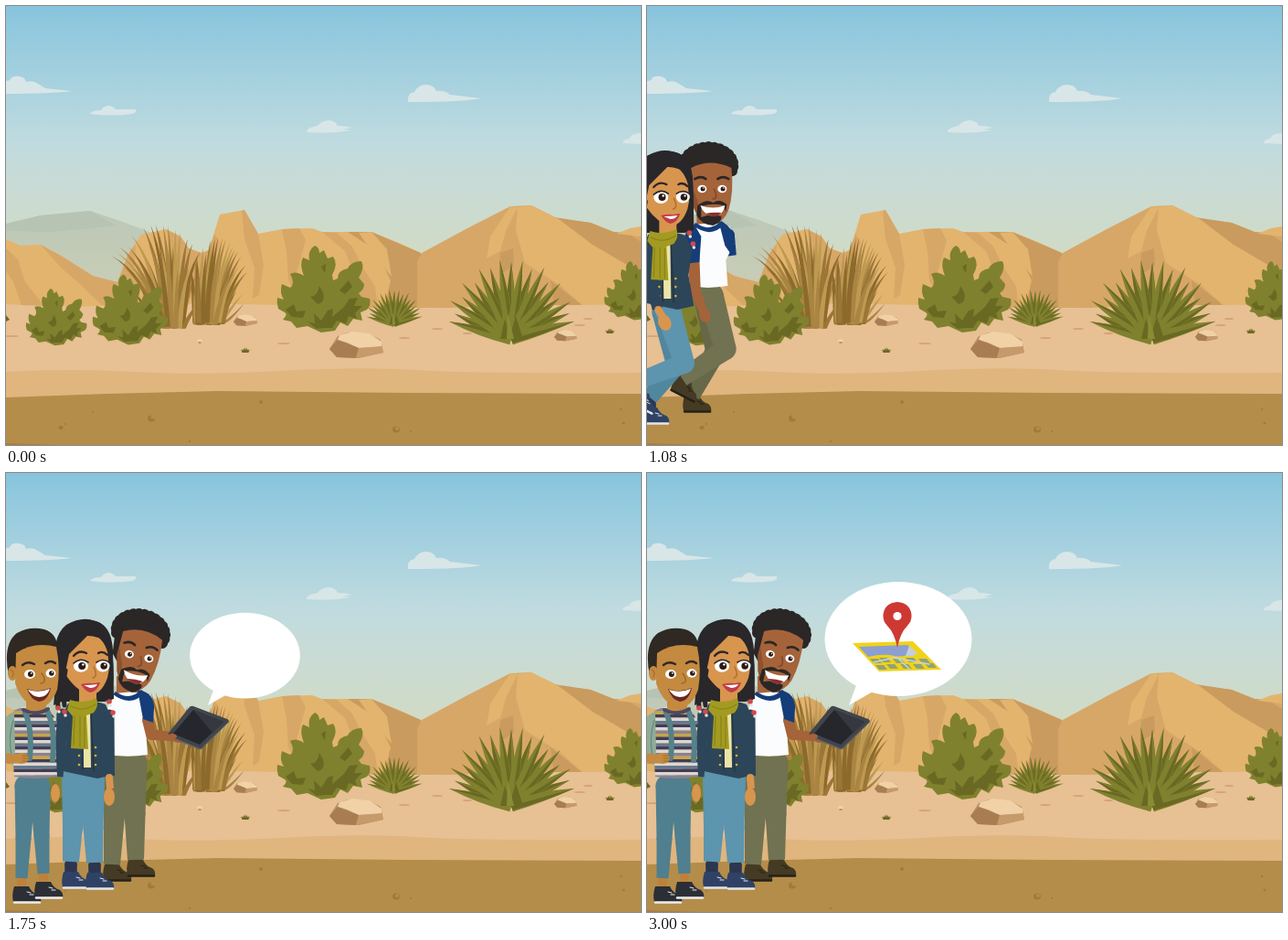
An HTML page with a canvas for the animation above (3080 ms loop, 695x480 px).

```html
<!DOCTYPE html>
<html lang="en">
<head>
<meta charset="utf-8">
<title>Desert walk</title>
<style>
html, body { margin: 0; width: 100%; height: 100%; overflow: hidden; }
canvas { display: block; width: 100%; height: 100%; }
</style>
</head>
<body>
<canvas id="stage" width="695" height="480"></canvas>
<script>
const W = 695, H = 480, LOOP = 3080, STEP = 1000 / 12;
const stage = document.getElementById('stage').getContext('2d');
let c = stage;

const clamp = v => Math.max(0, Math.min(1, v));
const smooth = v => v * v * (3 - 2 * v);
const paths = {};
const path = d => paths[d] || (paths[d] = new Path2D(d));

function fill(col, d) { c.fillStyle = col; c.fill(path(d)); }
function line(col, w, d) {
  c.strokeStyle = col; c.lineWidth = w;
  c.lineCap = c.lineJoin = 'round';
  c.stroke(path(d));
}
function oval(col, x, y, rx, ry = rx, rot = 0) {
  c.fillStyle = col;
  c.beginPath();
  c.ellipse(x, y, rx, ry, rot, 0, 7);
  c.fill();
}
function at(x, y, rot, s, draw) {
  c.save();
  c.translate(x, y); c.rotate(rot); c.scale(s, s);
  draw();
  c.restore();
}
function limb(col, x1, y1, w1, x2, y2, w2) {
  const a = Math.atan2(y2 - y1, x2 - x1) + Math.PI / 2;
  const nx = Math.cos(a) / 2, ny = Math.sin(a) / 2;
  c.fillStyle = col;
  c.beginPath();
  c.moveTo(x1 + nx * w1, y1 + ny * w1);
  c.lineTo(x2 + nx * w2, y2 + ny * w2);
  c.lineTo(x2 - nx * w2, y2 - ny * w2);
  c.lineTo(x1 - nx * w1, y1 - ny * w1);
  c.fill();
  oval(col, x1, y1, w1 / 2);
}
function blade(col, x0, y0, x1, y1, cx, cy, w) {
  c.fillStyle = col;
  c.beginPath();
  c.moveTo(x0 - w / 2, y0);
  c.quadraticCurveTo(cx - w / 2, cy, x1, y1);
  c.quadraticCurveTo(cx + w / 2, cy, x0 + w / 2, y0);
  c.fill();
}

/* ---------- scenery ---------- */

const OLIVE = '#80812e', DARK_OLIVE = '#6a6923';

function bush(x, y, s) {
  at(x, y, 0, s, () => {
    c.translate(-297, -262);
    fill(OLIVE, 'M345 357L330 350 318 352 312 345 303 343Q309 337 305 335L298 331Q296 325 297 319L304 321Q299 313 302 304L311 308Q317 304 311 293Q317 289 326 295Q321 282 325 275L332 278Q330 267 338 262Q343 264 343 270L348 267 352 276 358 274Q364 282 357 294L358 300 363 298Q363 289 374 287Q378 279 389 279Q393 286 386 297L392 304Q392 310 386 314L389 318 398 320Q400 327 395 332L388 335 390 344 380 342 374 350 366 346 360 355Z');
    fill(DARK_OLIVE, 'M340 353L330 345 338 347 337 336 345 344 352 333 358 331 357 340 370 329 376 320 385 319 381 328 390 328 382 336 384 342 375 339 372 347 362 344 357 352 348 352Z');
    fill(DARK_OLIVE, 'M333 318Q341 318 343 306L347 313Q350 324 341 326ZM306 332L315 326 318 334 328 333 325 341 313 340Z');
    fill(DARK_OLIVE, 'M365 311L375 300 379 307 371 315ZM345 285L350 282 349 292Z');
  });
}

function agave(x, y, s) {
  at(x, y, 0, s, () => {
    const n = 19;
    for (const back of [1, 0]) for (let i = 0; i < n; i++) {
      if (i % 2 !== back) continue;
      const f = i / (n - 1) * 2 - 1, a = f * 1.3;
      const len = 88 - 17 * Math.abs(f) - back * 7 + (i * 7 % 5);
      at(0, 0, a, 1, () => {
        blade(back ? DARK_OLIVE : OLIVE, 0, 0, 0, -len, -1, -len * .5, 13);
        c.fillStyle = back ? OLIVE : DARK_OLIVE;
        c.beginPath();
        c.moveTo(0, 0); c.lineTo(0, -len);
        c.quadraticCurveTo(5, -len * .5, 5, 0);
        c.fill();
      });
    }
    fill(DARK_OLIVE, 'M-12 0L-7 -22 -1 -5 5 -25 13 0Z');
    fill('#898c35', 'M-5 0L-4 -28 3 0Z');
  });
}

function reeds(base, mid, top, spread, foot, seed) {
  const rnd = () => (seed = seed * 16807 % 2147483647) / 2147483647;
  const cols = ['#8c6a2c', '#a98442', '#bd9a50', '#9a7637'];
  for (let i = 0; i < 38; i++) {
    const f = ((i * 11) % 38) / 37 * 2 - 1;
    const tall = i % 3 ? rnd() * 50 : 0;
    const tx = mid + f * spread, ty = top + f * f * 34 + tall;
    const bx = base + f * 15;
    blade(cols[i % 4], bx, foot + rnd() * 3, tx, ty, bx + (tx - bx) * .25, ty + 40 - 20 * Math.abs(f), 5.5);
  }
}

function tuft(x, y) {
  for (let i = -3; i < 4; i++) blade(DARK_OLIVE, x + i * .8, y, x + i * 2, y - 6 + Math.abs(i), x + i, y - 3, 2);
}

function rock(x, y, s) {
  at(x, y, 0, s, () => {
    fill('#b98f64', 'M0 19L9 5 20 1 43 2 56 9 59 23 32 29 8 28Z');
    fill('#f1d1a6', 'M11 4L25 0 44 2 57 11 57 17 32 18 19 12 9 9Z');
    fill('#a87d52', 'M0 19L9 9 32 18 29 29 8 28Z');
    fill('#c69a6b', 'M32 18L57 16 59 23 29 29Z');
  });
}

function scenery() {
  const sky = c.createLinearGradient(0, 0, 0, 270);
  [[0, '#86c3dc'], [.08, '#90c8de'], [.33, '#a9d2df'], [.55, '#bfdbdf'], [.72, '#c9dbd6'], [1, '#d0dbc5']]
    .forEach(([p, col]) => sky.addColorStop(p, col));
  c.fillStyle = sky;
  c.fillRect(0, 0, W, H);

  const cloud = '#d8e6e8';
  fill(cloud, 'M0 82Q5 82 6 78Q13 75 20 79L22 83Q30 81 35 85Q40 88 43 90L72 93Q50 96 0 96Z');
  fill(cloud, 'M92 118Q94 114 104 114Q107 109 113 109Q118 110 120 113Q130 113 142 113Q143 117 138 118Q115 121 92 118Z');
  fill(cloud, 'M440 104Q439 95 447 94Q451 86 460 86Q468 86 471 93Q480 92 486 97L520 101Q500 105 440 105Z');
  fill(cloud, 'M329 137Q329 133 341 131Q345 125 354 125Q361 126 363 131Q370 131 379 133L369 135 378 136Q355 140 329 138Z');
  fill(cloud, 'M675 150Q675 146 682 145Q684 139 695 139V151Z');

  const haze = c.createLinearGradient(0, 224, 0, 310);
  haze.addColorStop(0, '#bcc8b8');
  haze.addColorStop(1, '#c9cdb5');
  fill(haze, 'M0 238L38 229 92 224 125 235 165 250 175 310H0Z');
  fill('#b7c3b3', 'M0 238L38 229 92 224 120 240 95 243 50 247 0 246Z');

  const light = '#e3b46e', mid = '#d7a768', dark = '#ca9b5e';
  fill(light, 'M0 255L16 262 38 261 60 273 95 295 116 303 135 300V330H0Z');
  fill(mid, 'M38 261L60 273 95 295 130 304 130 330 105 327 82 305 60 286Z');
  fill(mid, 'M0 265L13 277 20 300 34 318 42 330H18L8 302 0 290Z');
  fill(light, 'M112 330L122 302 134 271 148 250 175 244 191 252 200 265 214 270 222 267 234 228 261 223 276 249 302 244 335 243 346 247 400 247 430 259 454 270 460 330Z');
  fill(mid, 'M112 330L122 302 134 271 142 260 140 290 150 330ZM175 244L191 252 200 265 214 270 222 267 228 249 234 258 226 290 233 330H205L192 290Z');
  fill(mid, 'M258 224L261 223 276 249 282 283 277 316 270 320 272 286 261 255ZM302 244L321 243 328 256 318 292 322 325 309 300 307 268Z');
  fill(mid, 'M346 247L362 248 379 263 390 285 404 307 407 330H378L385 303 371 268Z');
  fill(dark, 'M374 247L400 247 454 270 465 292 450 330H414L421 300 412 282 397 262Z');
  fill(light, 'M386 248L400 247 417 266 422 296 407 278Z');
  fill(mid, 'M450 330V280L455 270 505 243 552 219 575 218 605 233 640 237 665 247 680 248 695 241V330Z');
  fill(dark, 'M600 231L640 237 665 247 681 249 695 258V296L650 268Z');
  fill(light, 'M668 249L683 243 695 241V252Z');
  fill(light, 'M560 220L575 218 605 233 642 261 695 292V324L634 330 607 306 568 281 558 245Z');
  fill(light, 'M552 219L560 220 547 246 541 268 526 276 530 252Z');
  fill(dark, 'M541 270L555 265 556 284 540 294ZM596 300L634 330H600Z');

  fill('#e7c093', 'M0 326Q60 330 140 327T330 328 520 329 695 327V402H0Z');
  fill('#e0b57e', 'M0 400Q70 396 140 400T300 399Q390 394 450 398T695 401V430H0Z');
  fill('#b58d4a', 'M0 428L110 424 232 421 440 423 695 424V480H0Z');
  fill('#a67f41', 'M0 478L60 480H0Z');
  [[60, 461, 2.5], [95, 444, 1], [159, 451, 4], [201, 476, 1.2], [279, 433, 2], [427, 463, 4], [443, 465, 1], [673, 441, 1.2], [676, 456, 1.5], [65, 457, 1]]
    .forEach(([x, y, r]) => oval('#a17a38', x, y, r, r * .9));
  oval('#b58d4a', 161, 449, 2.5); oval('#b58d4a', 428, 462, 2);
  [[6, 361, 8], [304, 369, 7], [436, 363, 6], [472, 353, 6], [505, 358, 5], [628, 349, 6], [637, 342, 5], [205, 337, 5]]
    .forEach(([x, y, r]) => oval('#d6a17a', x, y, r, 1));
  oval('#f1d1a6', 212, 366, 3, 2); oval('#b98f64', 212, 368, 2, 1);
  fill(DARK_OLIVE, 'M0 338L4 343 0 345Z');

  reeds(179, 165, 239, 50, 350, 71);
  reeds(222, 233, 253, 31, 346, 19);
  rock(249, 337, .44);
  bush(22, 309, .655);
  bush(95, 293.5, .81);
  bush(297, 262, 1);
  bush(655, 279, .68);
  agave(425, 348, .44);
  agave(553, 364, 1);
  rock(354, 356, 1);
  rock(600, 354, .42);
  tuft(262, 379); tuft(661, 358);
}

/* ---------- people ---------- */

function shoe(x, y, rot, col, sole) {
  at(x, y, rot, 1, () => {
    fill(col, 'M-8 -7H8Q11 0 18 2Q22 5 21 10H-9Q-11 2 -8 -7Z');
    line(sole, 2.4, 'M-8 10.5H20');
    line(sole, 1, 'M6 -1L10 0M9 2L13 2');
  });
}

// Foot offset from the hip and its lift over one stride.
function stride(u) {
  u = (u % 1 + 1) % 1;
  if (u < .5) return [25 - 142 * u, 0];
  const p = u * 2 - 1;
  return [-46 + 71 * smooth(clamp((p - .45) / .5)), 20 * Math.sin(Math.PI * p)];
}

function leg(o, hx, ax, ay, rot, col, bend) {
  const hy = o.hip, dx = ax - hx, dy = ay - hy, d = Math.hypot(dx, dy);
  const out = bend ? Math.sqrt(Math.max(0, o.len * o.len - d * d)) / 2 : 0;
  const kx = hx + dx / 2 + out * dy / d, ky = hy + dy / 2 - out * dx / d;
  const [w1, w2, w3] = o.wide;
  limb(o.sock, ax, ay - 14, w3 * .75, ax, ay + 2, w3 * .75);
  shoe(ax, ay + 2, rot, o.shoe, o.sole);
  limb(col, hx, hy, w1, kx, ky, w2);
  limb(col, kx, ky, w2, ax, ay - o.cuff, w3);
}

function legs(o, u, stand) {
  if (stand) {
    o.feet.forEach(([hx, ax, ay]) => leg(o, hx, ax, ay, 0, o.pants, false));
    return;
  }
  [u + .5, u].forEach((v, i) => {
    const [fx, lift] = stride(v);
    leg(o, o.x + (i ? 2 : -2), o.x + fx, o.ankle - lift, lift * .025, i ? o.pants : o.far, true);
  });
}

const man = { x: 134, hip: 317, ankle: 431, len: 121, wide: [29, 23, 18], cuff: 5, pants: '#707251', far: '#666849',
  sock: '#4a3b25', shoe: '#453a23', sole: '#262018', feet: [[121, 116, 433], [140, 142, 428]] };
const woman = { x: 88, hip: 334, ankle: 444, len: 119, wide: [28, 22, 18], cuff: 16, pants: '#5d94ae', far: '#51869f',
  sock: '#2c3650', shoe: '#2f4265', sole: '#e4e6e8', feet: [[75, 71, 441], [94, 97, 442]] };
const youth = { x: 33, hip: 342, ankle: 456, len: 122, wide: [23, 17, 13], cuff: 14, pants: '#507f8f', far: '#467382',
  sock: '#bd813c', shoe: '#2b2e35', sole: '#eceded', feet: [[21, 17, 457], [37, 41, 452]] };

function eye(x, y, r) {
  oval('#fff', x, y, r, r * .85);
  oval('#2b1a14', x + r * .15, y, r * .5);
  oval('#fff', x + r * .3, y - r * .2, r * .15);
}

function manHead() {
  const skin = '#a5633a', ink = '#2a2726';
  oval(ink, -2, -29, 28, 22);
  for (let i = 0; i < 17; i++) {
    const a = Math.PI * (.9 + i / 16 * 1.2);
    oval(ink, -2 + 27 * Math.cos(a), -29 + 20 * Math.sin(a), 6);
  }
  fill(ink, 'M-30 -30L-27 0 -20 8 -14 -25Z');
  fill(skin, 'M-21 -26Q0 -37 23 -26Q26 0 20 20Q15 33 3 36Q-12 34 -18 18L-22 0Z');
  fill('#8e512d', 'M-21 -8L-22 0 -18 18 -12 29 -14 10Z');
  line(ink, 2.6, 'M-17 -14Q-10 -18 -5 -14M8 -14Q14 -18 20 -14');
  eye(-9, -3, 5); eye(13, -3, 5);
  line('#83492a', 1.6, 'M4 -3Q9 7 3 8');
  fill(ink, 'M-14 15Q-4 7 3 12Q10 7 18 14L17 22 14 15Q3 12 -10 16L-10 28Q2 23 12 27Q13 33 3 37Q-10 36 -15 26Z');
  fill('#fff', 'M-11 15Q3 20 16 15Q14 26 4 27Q-7 26 -11 15Z');
  fill('#8b2f2c', 'M-6 24Q4 22 12 23Q8 28 2 27Z');
}

function tablet() {
  fill('#41454c', 'M205 255Q202 254 200 257L178 284Q177 288 180 289L211 302Q214 303 216 300L243 273Q245 270 242 269Z');
  fill('#25272c', 'M205 259L238 272 212 297 183 285Z');
  fill('#35383e', 'M205 259L238 272 226 284Z');
  line('#6a6e75', 1, 'M179 288L213 302 244 272');
}

function drawMan(u, stand, bob) {
  const skin = '#a5633a', navy = '#143d79';
  if (!stand) limb(navy, 156, 250, 13, 159, 273, 11);
  legs(man, u, stand);
  c.translate(0, bob);
  fill(skin, 'M121 222H146V248H121Z');
  fill('#fbfcfe', 'M113 243Q135 236 157 243L162 262 153 280 155 308Q130 312 107 307Z');
  fill(navy, 'M120 239Q135 250 148 237L152 240Q137 257 117 242Z');
  if (stand) {
    limb(skin, 155, 270, 12, 159, 286, 12);
    limb(skin, 159, 286, 12, 190, 289, 9);
    fill(navy, 'M144 237Q163 240 162 258L161 273 150 269Z');
    oval(skin, 189, 289, 8, 6);
    tablet();
    oval(skin, 182, 288, 5, 3);
    at(143, 203, .22, 1, manHead);
  } else {
    fill(navy, 'M145 237Q163 242 162 264L159 274 152 264Z');
    limb(skin, 117, 276, 14, 120, 315, 11);
    limb(skin, 120, 315, 12, 129, 337, 9);
    oval(skin, 130, 340, 6, 8, -.3);
    fill(navy, 'M119 242Q108 243 107 262L108 284 124 282 126 254Z');
    at(136, 205, 0, 1, manHead);
  }
}

function drawWoman(u, stand, bob) {
  const skin = '#d8954e', ink = '#29272a', denim = '#2d4558', seam = '#20323f';
  legs(woman, u, stand);
  c.translate(0, bob);
  fill(ink, 'M55 222Q48 180 66 166Q82 157 94 161Q116 164 117 195L118 247 108 250H61L52 254Z');
  fill(denim, 'M68 252Q90 246 109 253L116 270 112 296 118 330 100 334 62 326 66 290 60 268Z');
  fill('#ece4a6', 'M84 255H92L93 322H85Z');
  line(seam, 1.2, 'M84 270L84 325M93 262L96 326');
  [300, 309, 319].forEach(y => { oval('#d6b13b', 98, y, 1.3); oval('#d6b13b', 80, y, 1.3); });
  if (stand) {
    limb(denim, 113, 264, 11, 113, 331, 12);
    limb(skin, 113, 333, 8, 114, 345, 8);
    oval(skin, 113, 354, 6, 10);
    oval(skin, 54, 350, 5, 10);
    limb(denim, 62, 264, 13, 57, 332, 11);
  } else {
    limb(denim, 70, 262, 16, 71, 305, 14);
    limb(denim, 71, 305, 14, 78, 333, 11);
    limb(skin, 79, 334, 8, 84, 342, 8);
    oval(skin, 86, 348, 7, 9, -.4);
  }
  fill(skin, 'M80 232H99V252H80Z');
  fill('#a39b21', 'M70 248Q84 253 99 246Q102 255 96 262L88 265 90 302 71 301 73 266 67 259Z');
  line('#8b841a', 1.3, 'M71 255Q84 262 98 253M75 266L74 298M81 266L81 299M86 267L86 300');

  fill(skin, 'M65 186Q90 170 112 186Q116 205 111 224Q105 241 93 243Q76 238 65 220Z');
  fill(ink, 'M57 220Q52 182 68 167Q86 157 98 162Q116 166 117 202L112 200Q109 182 93 174Q81 186 69 198L64 222Z');
  line(ink, 5, 'M60 212Q54 232 57 256M65 216Q61 236 64 254M114 198Q117 224 113 248');
  line(ink, 2.3, 'M74 200Q80 193 88 197M101 197Q106 194 111 199');
  eye(82, 211, 8); eye(106, 211, 7.5);
  line(ink, 1.6, 'M74 208Q82 201 90 207M99 207Q106 202 113 207');
  line('#b06f35', 1.5, 'M96 212Q101 223 95 224');
  fill('#bf3d45', 'M82 231Q91 229 95 230L103 229Q100 239 92 240Q86 238 82 231Z');
  fill('#fff', 'M85 232Q93 232 100 231Q98 235 92 235Z');
  [[57, 257], [64, 261], [113, 250], [117, 262]].forEach(([x, y]) => {
    oval('#cf4a4a', x, y, 2.8); oval('#e9dfe0', x + 1, y + 4, 1.8);
  });
}

function drawYouth(u, stand, bob) {
  const skin = '#c48a40', ink = '#302822', strap = '#568188';
  legs(youth, u, stand);
  c.translate(0, bob);
  c.save();
  c.clip(path('M8 260Q28 250 47 258L56 272 54 290 56 332Q32 336 9 332L6 290Z'));
  ['#413c56', '#dcd7d2', '#8b8191', '#c4a64b', '#413c56', '#dcd7d2', '#66798c'].forEach((col, i) => {
    c.fillStyle = col;
    for (let y = 250 + i * 3.5; y < 338; y += 24.5) c.fillRect(0, y, 60, 3.6);
  });
  c.restore();
  line(strap, 6, 'M21 262Q29 280 26 312M46 262Q54 280 51 314');
  fill('#8eac98', 'M9 261Q-7 266 -9 292L-4 316 8 319 10 303Z');
  line('#68897f', 1.2, 'M8 270Q2 290 6 308');
  limb(skin, 2, 312, 11, 15, 313, 9);
  oval(skin, 17, 312, 8, 6);
  line('#a06d2d', 1, 'M18 309H24M18 312H25M18 315H23');
  fill(skin, 'M22 244H44V260Q34 265 22 259Z');
  line('#4f4963', 4, 'M19 259Q33 266 46 258');

  fill(ink, 'M3 222Q-4 187 12 175Q26 167 42 171Q57 176 56 193L30 200 12 224Z');
  fill(skin, 'M11 197Q30 184 55 190Q60 214 56 237Q49 256 35 257Q17 252 10 230Z');
  oval(skin, 7, 219, 5, 8); line('#a06d2d', 1.2, 'M5 215Q10 217 7 223');
  line(ink, 2.4, 'M18 210Q24 205 31 209M43 208Q49 204 54 208');
  eye(26, 220, 6); eye(49, 219, 5.5);
  line('#9d6a2c', 1.6, 'M39 219Q46 229 38 230');
  fill('#6b2722', 'M23 236Q36 241 49 235Q46 249 36 250Q27 248 23 236Z');
  fill('#fff', 'M24 237Q36 241 48 236Q45 245 36 245Q28 244 24 237Z');
}

/* ---------- speech bubble ---------- */

function bubble(s) {
  at(221, 254, 0, s, () => {
    c.translate(-221, -254);
    oval('#fefffe', 275, 181.5, 80.5, 62.5);
    fill('#fefffe', 'M229 232L221 254 249 238Z');
  });
}

function map() {
  fill('#f1d219', 'M225 186L291 184 322 215 254 217Z');
  fill('#8c9fd0', 'M232 190L285 188Q291 192 288 197Q280 203 266 199Q255 198 242 201Z');
  fill('#c4cfdc', 'M287 189L296 197 291 200 283 200Z');
  [[244, 203], [254, 202], [269, 203], [283, 202], [297, 203], [250, 210], [262, 209], [277, 209], [291, 209], [304, 208]]
    .forEach(([x, y]) => {
      c.fillStyle = '#90a377';
      c.beginPath();
      c.moveTo(x, y); c.lineTo(x + 9, y); c.lineTo(x + 13, y + 5); c.lineTo(x + 4, y + 5);
      c.fill();
    });
  line('#c5d6d4', 1.5, 'M248 207L270 202 287 205 309 209M274 202L287 214');
}

function pin() {
  fill('#cd3932', 'M274 191Q271 175 263 167Q258 162 258.5 155Q260 142 274 141Q288 142 289.5 155Q290 162 285 167Q277 175 274 191Z');
  oval('#fff', 274, 156.5, 4.6);
}

/* ---------- playback ---------- */

const ground = document.createElement('canvas');
ground.width = W; ground.height = H;
c = ground.getContext('2d');
scenery();
c = stage;

const STOP = 18, CONTACT = 16;

function draw(t) {
  const k = Math.floor((t + 3.4) / STEP);
  const stand = k >= STOP;
  const u = (k - CONTACT) * STEP / 1280;
  const bob = stand ? 0 : -2 * Math.abs(Math.sin(2 * Math.PI * u));
  const dx = (Math.min(k, STOP) - STOP) * 40 / 3;
  const ramp = from => clamp((k - from) / 4);

  c.globalAlpha = 1;
  c.drawImage(ground, 0, 0);
  [drawMan, drawWoman, drawYouth].forEach(person => at(dx, 0, 0, 1, () => person(u, stand, bob)));

  const grow = 1 - (1 - ramp(19)) ** 2;
  if (grow > 0) bubble(grow);
  c.globalAlpha = ramp(23);
  map();
  c.globalAlpha = ramp(27);
  pin();
  c.globalAlpha = 1;
}

const start = performance.now();
function tick() {
  draw((performance.now() - start) % LOOP);
  requestAnimationFrame(tick);
}
tick();
</script>
</body>
</html>
```
